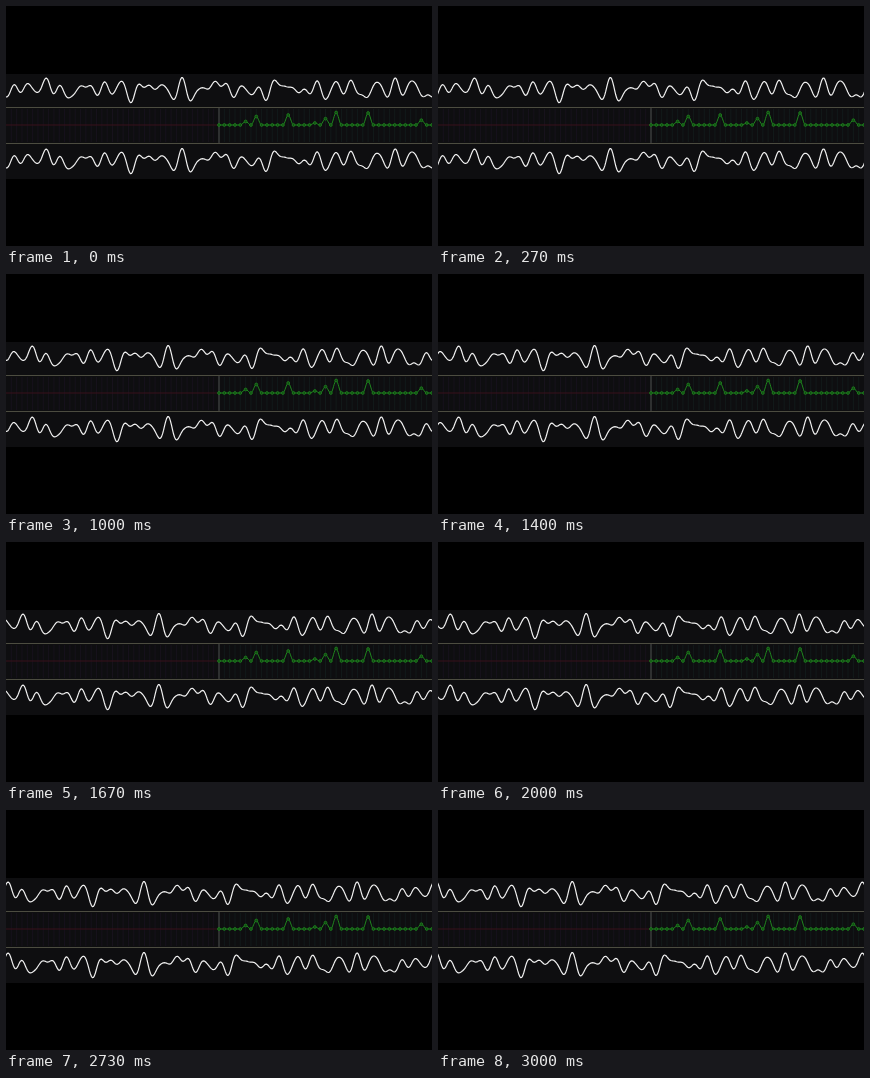
Recreate the animation shown at these times as an HTML page. Size 426 by 240 pixels, loop 3070 ms.

```html
<!DOCTYPE html>
<html lang="en">
<head>
<meta charset="utf-8">
<title>Signal and spectrum</title>
<style>
  html, body { margin: 0; width: 100%; height: 100%; overflow: hidden; background: #000; }
  svg { display: block; width: 100%; height: 100%; }
  path, line { fill: none; }
</style>
</head>
<body>
<svg id="stage" viewBox="0 0 426 240"></svg>
<script>
const WIDTH = 426, MID = WIDTH / 2, BINS = 40, GAP = MID / BINS;
const LOOP = 3070, STEP = 200 / 3, SPEED = 0.93, LEAD = 0.5;
const BASE = 119, CENTRE = 83.2, GAIN = 0.32;
const stage = document.getElementById('stage');

// Tones of the periodic signal; heights are those seen in the spectrum
const tones = [
  { bin: 5, height: 3.5, phase: 159 },
  { bin: 7, height: 8.5, phase: 178 },
  { bin: 13, height: 10, phase: 129.5 },
  { bin: 18, height: 2, phase: 163 },
  { bin: 20, height: 6.3, phase: 120 },
  { bin: 22, height: 12.5, phase: 7.5 },
  { bin: 28, height: 12, phase: -162.4 },
  { bin: 38, height: 4.8, phase: -117.3 }
];

function signal(x) {
  const sum = tones.reduce((total, { bin, height, phase }) =>
    total + height * Math.cos(2 * Math.PI * (bin * x / WIDTH - phase / 360)), 0);
  return CENTRE - GAIN * sum;
}

function magnitude(bin) {
  const tone = tones.find(t => t.bin === bin);
  return tone ? tone.height : 0;
}

function add(tag, attrs) {
  const el = document.createElementNS('http://www.w3.org/2000/svg', tag);
  for (const k in attrs) el.setAttribute(k, attrs[k]);
  return stage.appendChild(el);
}

const line = (x1, y1, x2, y2, stroke) =>
  add('line', { x1, y1, x2, y2, stroke, 'stroke-width': 1 });

// Soft curve with level tangents at every point
function softCurve(points) {
  return points.map(([x, y], i) => {
    if (!i) return `M${x},${y}`;
    const [px, py] = points[i - 1], h = (x - px) / 3;
    return `C${px + h},${py} ${x - h},${y} ${x},${y}`;
  }).join('');
}

// Panels and faint grid
add('rect', { x: 0, y: 68, width: WIDTH, height: 105, fill: '#0e0e10' });
for (let k = 1 - BINS; k < BINS; k++) {
  const x = MID + k * GAP;
  line(x, 103, x, 136, k < 0 ? '#17121c' : '#121a1a');
}
line(0, BASE, MID, BASE, '#38101a');
line(0, 101.5, WIDTH, 101.5, '#4c4c40');
line(0, 137.5, WIDTH, 137.5, '#4c4c40');
line(MID, 102, MID, 137, '#4c4c4c');

// Spectrum
const spectrum = Array.from({ length: BINS + 1 }, (_, k) => [MID + k * GAP, BASE - magnitude(k)]);
add('path', { d: softCurve(spectrum), stroke: '#1f861f', 'stroke-width': 1 });
for (const [cx, cy] of spectrum) {
  add('circle', { cx, cy, r: 1.4, fill: '#124a12', stroke: '#1f861f', 'stroke-width': 0.8 });
}

// The same scrolling signal above and below
const samples = [];
for (let x = -4; x <= WIDTH + 50; x++) samples.push(`${x},${signal(x).toFixed(2)}`);
const waves = [0, 71].map(y => ({
  y,
  el: add('path', {
    d: 'M' + samples.join('L'), stroke: '#f0f0f0', 'stroke-width': 1.2, 'stroke-linejoin': 'round'
  })
}));

function draw(now) {
  // Steps fall on whole hundredths of a second
  const t = Math.floor((now % LOOP) / 10) * 10 + 5;
  const x = LEAD - Math.floor(t / STEP) * SPEED;
  for (const { y, el } of waves) el.setAttribute('transform', `translate(${x} ${y})`);
}

const start = performance.now();
function tick() {
  draw(performance.now() - start);
  requestAnimationFrame(tick);
}
tick();
</script>
</body>
</html>
```
